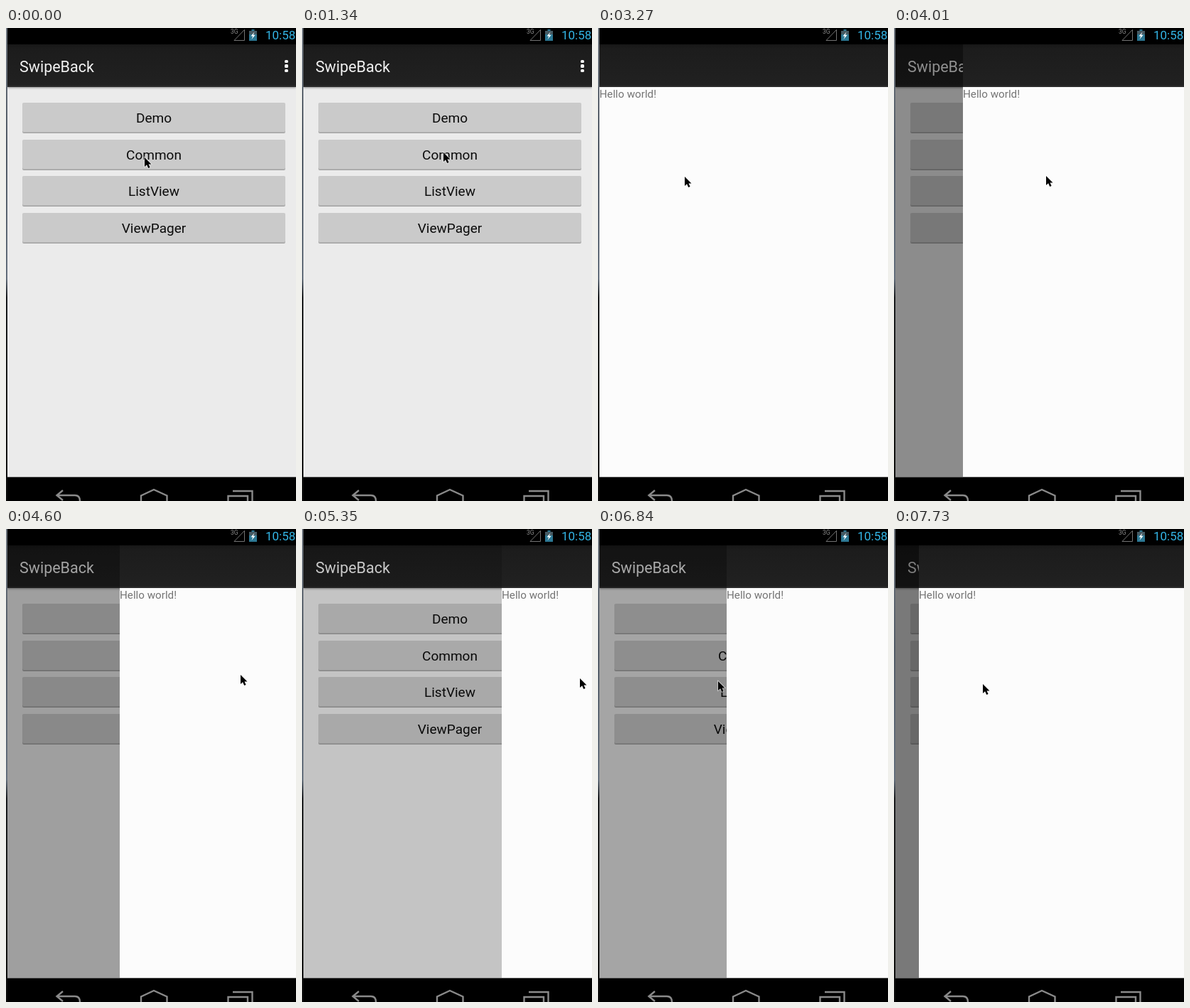
An HTML page for the animation above (8 s loop, 408 px wide and 665 px high).

```html
<!DOCTYPE html>
<html lang="en">
<head>
<meta charset="utf-8">
<title>Swipe back</title>
<style>
  html, body { margin: 0; width: 100%; height: 100%; overflow: hidden; background: #000; }
  #stage { position: relative; width: 408px; height: 665px; overflow: hidden; background: #000;
    font-family: Roboto, "Open Sans", sans-serif; white-space: nowrap; }
  #stage div, #stage svg { position: absolute; }
  .edge { left: 0; top: 0; width: 2px; height: 665px;
    background: linear-gradient(#70777f, #525b66 25%, #65707d 53%, #1b1d1f 57%, #191a17 80%, #0c0c0c); }
  .clock { left: 365px; top: 0; font-size: 17px; line-height: 20px; color: #33b5e5; }
  .network { left: 316px; top: 0; font-size: 8.5px; line-height: 10px; color: #8c8c8c; }
  .view { left: 2px; top: 23px; width: 406px; height: 608px; overflow: hidden; }
  .page { inset: 0; background: #ebebeb; }
  .bar { left: 0; top: 0; width: 406px; height: 60px;
    background: linear-gradient(#171717, #1c1c1c 6px, #212121 57px, #2c2c2c 59px); }
  .bar.shadow { box-shadow: 0 1px 3px rgba(0, 0, 0, .4); }
  .title { left: 17px; top: 0; font-size: 21.5px; line-height: 63px; color: #f1f1f1; }
  .dot { left: 390px; width: 4.6px; height: 4.6px; border-radius: 1.6px; background: #f4f4f4; }
  .button { left: 21px; width: 370px; height: 42px; border-radius: 2px; background: #cacaca;
    box-shadow: inset 0 -1px #b4b4b4, 0 1px #a2a2a2; text-align: center;
    font-size: 19px; line-height: 44px; color: #0c0c0c; }
  .button.pressed { background: #9ccbdc; box-shadow: inset 0 -1px #7fb3c6, 0 0 0 4px rgba(51, 181, 229, .45); }
  #dim { inset: 0; background: #000; }
  #second { background: #fcfcfc; transform-origin: 206px 292px; }
  .hello { left: 0; top: 60px; font-size: 15.2px; line-height: 21px; color: #747474; }
  .navline { left: 2px; top: 631px; width: 406px; height: 1px; background: #555; }
  #cursor { left: 0; top: 0; overflow: visible; }
</style>
</head>
<body>
<div id="stage">
  <div class="edge"></div>

  <div class="network">3G</div>
  <svg width="408" height="23" fill="none">
    <path d="M321 17.5H335.5V2.5Z" stroke="#737373"/>
    <path d="M345.5 2H349.5V4H353V18H342V4H345.5Z" fill="#2c7894"/>
    <path d="M342 4H353V9H342Z" fill="#465b64"/>
    <path d="M349.5 5.5L344.5 11.5H347.3L345.5 16L350.7 9.8H347.8Z" fill="#fff"/>
  </svg>
  <div class="clock">10:58</div>

  <div class="view">
    <div class="page" id="first">
      <div class="bar shadow"></div>
      <div class="title">SwipeBack</div>
      <div class="dot" style="top:21.5px"></div>
      <div class="dot" style="top:28px"></div>
      <div class="dot" style="top:34.5px"></div>
    </div>
    <div id="dim"></div>
    <div class="page" id="second">
      <div class="bar"></div>
      <div class="hello">Hello world!</div>
    </div>
  </div>

  <div class="navline"></div>
  <svg width="408" height="665" fill="none" stroke="#8a8a8a" stroke-width="2.4">
    <path d="M80 650L71.5 657L80 664M72 657H97Q104 657 104 665"/>
    <path d="M190 667V657.5L208 649L226.500 657.500V667"/>
    <path d="M312.500 667V658H340V667M319 651H346.500V667"/>
  </svg>

  <svg id="cursor" width="12" height="18">
    <path d="M0 0V13L3.100 10.200L5.200 15L7.600 14L5.500 9.400H9.500Z" fill="#000"
      stroke="#fff" stroke-opacity=".7" stroke-width="1.4" paint-order="stroke"/>
  </svg>
</div>

<script>
  const LOOP = 8000, STEP = 148.7, LAST = 52;
  const WIDTH = 406;
  const byId = id => document.getElementById(id);
  const first = byId('first'), second = byId('second'), dim = byId('dim'), cursor = byId('cursor');

  const buttons = ['Demo', 'Common', 'ListView', 'ViewPager'].map((label, i) => {
    const el = document.createElement('div');
    el.className = 'button';
    el.style.top = Math.round(82 + i * 51.5) + 'px';
    el.textContent = label;
    return first.appendChild(el);
  });

  // Keys are [step, value...]; one step is one screen refresh.
  const pointer = [
    [0, 195, 182], [1, 198, 177], [2, 198, 177], [3, 198, 176], [4, 198, 176],
    [5, 199, 175], [10, 199, 175], [15, 167, 195], [18, 140, 204], [22, 122, 209],
    [24, 108, 210], [26, 200, 208], [28, 228, 207], [29, 235, 206], [31, 330, 205],
    [33, 380, 208], [36, 391, 210], [39, 390, 211], [41, 366, 212], [43, 330, 213],
    [46, 169, 214], [48, 112, 216], [49, 108, 217], [50, 122, 217], [51, 143, 218], [52, 125, 218]
  ];
  const slide = [
    [24, 0], [25, 18], [26, 60], [27, 95], [28, 115], [30, 130], [31, 158], [32, 213],
    [33, 256], [34, 270], [36, 279], [41, 279], [43, 273], [44, 253], [45, 218],
    [46, 179], [47, 108], [48, 40], [49, 11], [50, 13], [51, 30], [52, 33]
  ];
  const opening = [[12, 0], [13, .12], [14, .32], [15, .54], [16, .77], [17, .94], [18, 1]];

  function sample(keys, n) {
    const i = keys.findIndex(k => k[0] >= n);
    if (i < 0) return keys[keys.length - 1].slice(1);
    if (i === 0) return keys[0].slice(1);
    const a = keys[i - 1], b = keys[i], f = (n - a[0]) / (b[0] - a[0]);
    return a.slice(1).map((v, j) => v + (b[j + 1] - v) * f);
  }

  function draw(time) {
    const n = Math.min(LAST, Math.floor((time % LOOP + 10) / STEP));
    const [px, py] = sample(pointer, n).map(Math.round);
    const x = Math.round(sample(slide, n)[0]);
    const [open] = sample(opening, n);
    const sx = .8 + .2 * open, sy = 1 - (1 - sx) * 1.1;

    cursor.style.transform = `translate(${px}px, ${py}px)`;
    second.style.opacity = open;
    second.style.transform = `translateX(${x}px) scale(${sx}, ${sy})`;
    dim.style.opacity = open < 1 ? 0 : .53 * (1 - x / WIDTH);
    buttons[1].classList.toggle('pressed', n === 8);
  }

  const start = performance.now();
  (function tick() {
    draw(performance.now() - start);
    requestAnimationFrame(tick);
  })();
</script>
</body>
</html>
```
